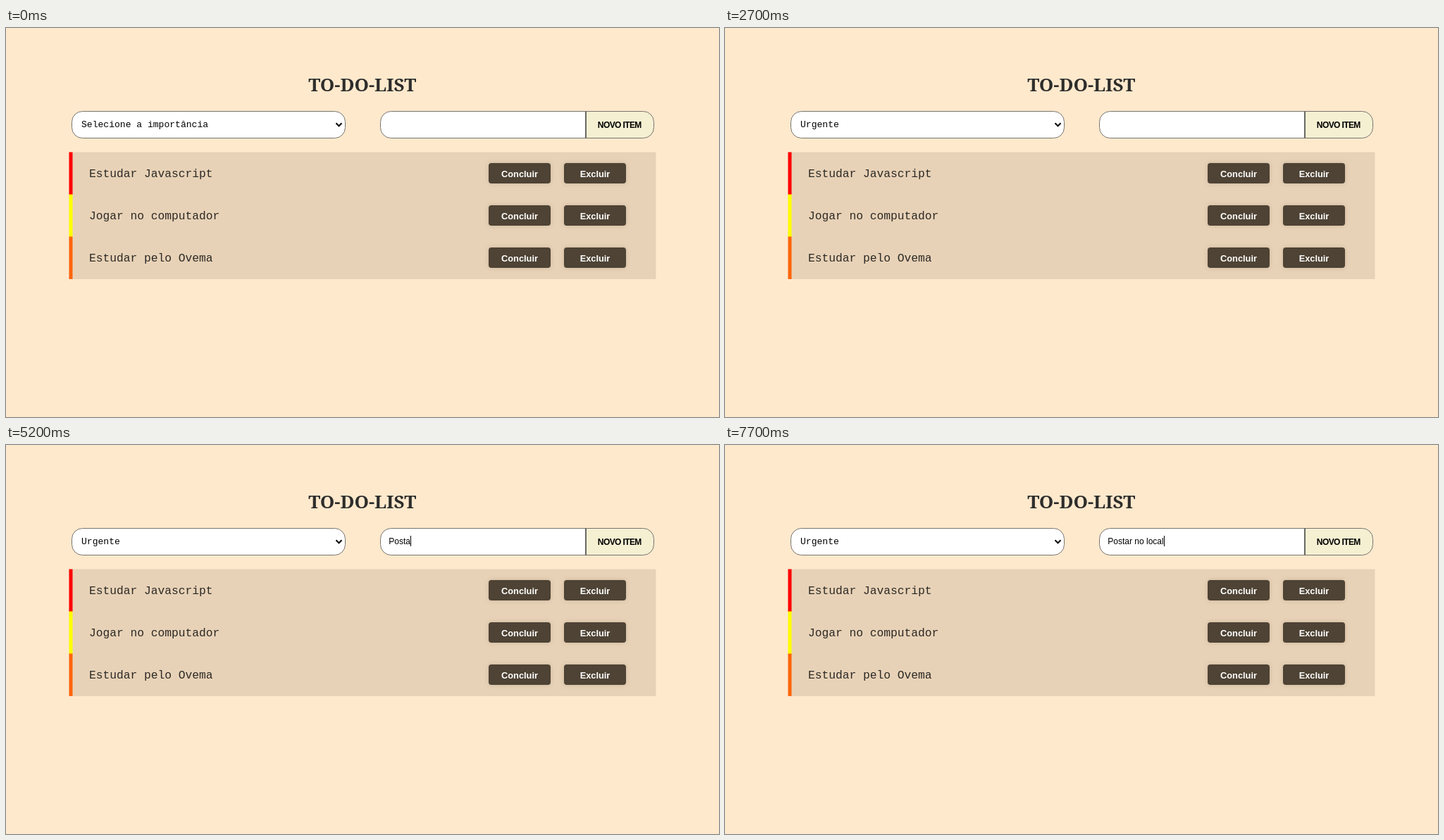
These frames come from a looping animation (1012 px wide and 553 px high, 8000 ms). An HTML page:

```html
<!DOCTYPE html>
<html lang="pt-BR">
<head>
<meta charset="utf-8">
<title>To-do list</title>
<style>
  html, body { margin: 0; width: 100%; height: 100%; overflow: hidden; background: #ffe9cd; }
  svg { display: block; width: 100vw; height: 100vh; }
  text { white-space: pre; }
  .title { font: 700 26.1px "Noto Serif", serif; fill: #2d2d2b; text-anchor: middle; }
  .mono { font: 13.05px "Liberation Mono", monospace; }
  .task { font: 16.25px "Liberation Mono", monospace; fill: #2b2925; }
  .field { font: 12px "Liberation Sans", sans-serif; }
  .add { font: 700 12px "Liberation Sans", sans-serif; letter-spacing: -.6px; text-anchor: middle; }
  .label { font: 700 12.8px "Liberation Sans", sans-serif; fill: #fff; text-anchor: middle; }
  .button { fill: #4e4334; filter: drop-shadow(0 0 3px rgba(78, 67, 52, .2)); }
  .outline { stroke: #77736d; }

  #menu { animation: menu-open 8s step-end infinite; }
  #hover { animation: option-hover 8s step-end infinite; }
  #first { animation: hint-leave 8s step-end infinite; }
  #hint { animation: hint-color 8s step-end infinite; }
  #urgent { animation: option-color 8s step-end infinite; }
  #empty { animation: value-empty 8s step-end infinite; }
  #chosen { animation: value-chosen 8s step-end infinite; }
  @keyframes menu-open { 0%, 33.75%, 100% { visibility: hidden; } 18.75% { visibility: visible; } }
  @keyframes option-hover { 0% { opacity: 0; } 26.25%, 100% { opacity: 1; } }
  @keyframes hint-leave { 0% { opacity: 1; } 26.25%, 100% { opacity: 0; } }
  @keyframes hint-color { 0% { fill: #7d7d7d; } 26.25%, 100% { fill: #6d6d6d; } }
  @keyframes option-color { 0% { fill: #000; } 26.25%, 100% { fill: #fff; } }
  @keyframes value-empty { 0% { opacity: 1; } 33.75%, 100% { opacity: 0; } }
  @keyframes value-chosen { 0% { opacity: 0; } 33.75%, 100% { opacity: 1; } }
</style>
</head>
<body>
<svg viewBox="0 0 1012 553" preserveAspectRatio="none">
  <text class="title" x="505.8" y="90">TO-DO-LIST</text>

  <rect class="outline" x="93.5" y="118.5" width="388" height="38" rx="15" fill="#fff"/>
  <text class="mono" id="empty" x="107" y="141">Selecione a importância</text>
  <text class="mono" id="chosen" x="107" y="141">Urgente</text>
  <path d="M468.5 135.3l4 4 4-4" fill="none" stroke="#000" stroke-width="2"/>

  <path class="outline" d="M823 118.5H546.5a15 15 0 0 0-15 15v8a15 15 0 0 0 15 15H823z" fill="#fff"/>
  <path class="outline" d="M823 118.5H904.5a15 15 0 0 1 15 15v8a15 15 0 0 1-15 15H823z" fill="#f5f0d2"/>
  <path d="M823 118v39" stroke="#6b6862" stroke-width="2"/>
  <text class="add" x="870.8" y="142">NOVO ITEM</text>
  <text class="field" id="typed" x="543.3" y="141"></text>
  <rect id="caret" y="129" width="1" height="15"/>

  <g id="list"></g>

  <g id="menu">
    <rect x="93.5" y="157.5" width="388" height="82" fill="#fff" stroke="#777"/>
    <rect id="first" x="94" y="158" width="387" height="20" fill="#c7c7c7"/>
    <rect id="hover" x="94" y="178" width="387" height="20.5" fill="#1e90ff"/>
    <text class="mono" id="hint" x="107" y="172">Selecione a importância</text>
    <text class="mono" id="urgent" x="107" y="192.5">Urgente</text>
    <text class="mono" x="107" y="213">Semi-Urgente</text>
    <text class="mono" x="107" y="233.5">Não Urgente</text>
  </g>
</svg>
<script>
  const LOOP = 8000;
  const byId = id => document.getElementById(id);
  const typed = byId('typed');
  const caret = byId('caret');

  const tasks = [
    ['Estudar Javascript', '#f00'],
    ['Jogar no computador', '#ff0'],
    ['Estudar pelo Ovema', '#ff660c']
  ];

  const button = (x, label) => `
    <rect class="button" x="${x}" y="15" width="88" height="29" rx="4"/>
    <text class="label" x="${x + 44}" y="34.5">${label}</text>`;

  byId('list').innerHTML = '<rect x="89.5" y="176.5" width="833" height="180.5" fill="#e8d2b7"/>' +
    tasks.map(([name, color], i) => `
      <g transform="translate(0 ${177 + i * 60})">
        <rect x="89.5" y="-.5" width="5" height="60.5" fill="${color}"/>
        <text class="task" x="118" y="35">${name}</text>
        ${button(685, 'Concluir')}${button(792, 'Excluir')}
      </g>`).join('');

  // Each step: start time, field text, caret shown
  const steps = [
    [0, '', false], [3600, '', true], [4000, '', false],
    [4400, 'P', true], [4500, 'Po', true], [4700, 'Pos', true],
    [5000, 'Post', true], [5200, 'Posta', true], [5400, 'Postar', true],
    [5600, 'Postarn', true], [6000, 'Postarn', false], [6100, 'Postarn', true],
    [6200, 'Postar', true], [6300, 'Postar ', true], [6500, 'Postar n', true],
    [6700, 'Postar no', true], [6900, 'Postar no ', true], [7100, 'Postar no l', true],
    [7300, 'Postar no lo', true], [7400, 'Postar no loc', true],
    [7500, 'Postar no loca', true], [7700, 'Postar no local', true]
  ];

  // Share one clock between the typing and the CSS animations
  const animations = document.getAnimations();
  let current;

  function draw() {
    const time = performance.now() % LOOP;
    for (const animation of animations) animation.currentTime = time;
    const step = steps.findLast(([start]) => start <= time);
    if (step !== current) {
      current = step;
      typed.textContent = step[1];
      const width = step[1] ? typed.getComputedTextLength() : 0;
      caret.setAttribute('x', Math.round(543.3 + width));
      caret.setAttribute('visibility', step[2] ? 'visible' : 'hidden');
    }
    requestAnimationFrame(draw);
  }
  draw();
</script>
</body>
</html>
```
